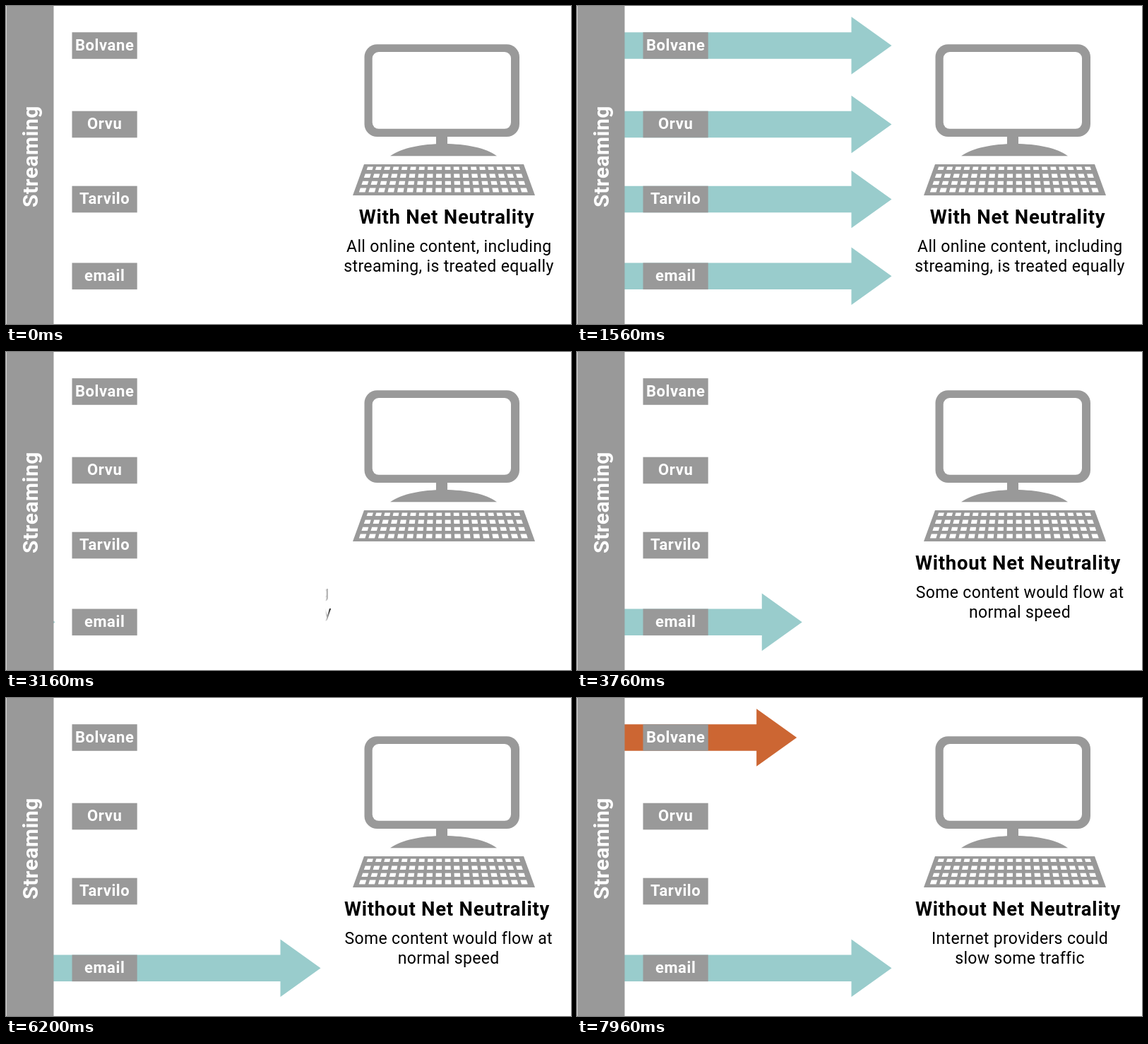
Animation of 800x450 px, one loop 8 s. Source, as an HTML page:

```html
<!DOCTYPE html>
<html lang="en">
<head>
<meta charset="utf-8">
<title>Net neutrality</title>
<style>
  html, body { margin: 0; width: 100%; height: 100%; overflow: hidden; background: #fff; }
  svg { display: block; width: 100%; height: 100%; }
  text { font-family: Roboto, sans-serif; text-anchor: middle; }
  .label { font-size: 22px; font-weight: 700; letter-spacing: .6px; fill: #fff; }
  .side { font-size: 30px; font-weight: 700; letter-spacing: .5px; fill: #fff; }
  .title { font-size: 27.5px; font-weight: 700; letter-spacing: .75px; }
  .sub { font-size: 23px; letter-spacing: .35px; }
</style>
</head>
<body>
<svg viewBox="0 0 800 450">
  <defs>
    <linearGradient id="fade" gradientUnits="userSpaceOnUse" x1="452" y1="0" x2="792" y2="0">
      <stop offset="0" stop-color="#000"/>
      <stop offset=".024" stop-color="#fff"/>
      <stop offset=".974" stop-color="#fff"/>
      <stop offset="1" stop-color="#000"/>
    </linearGradient>
    <mask id="window" maskUnits="userSpaceOnUse" x="452" y="270" width="340" height="130">
      <rect x="452" y="270" width="340" height="130" fill="url(#fade)"/>
    </mask>
  </defs>
  <rect width="800" height="450" fill="#fff"/>
  <g id="arrows"></g>
  <g id="labels"></g>
  <rect x=".6" width="66.9" height="450" fill="#999"/>
  <text class="side" transform="translate(45 213) rotate(-90)">Streaming</text>

  <g fill="#999">
    <rect x="507.5" y="54.2" width="219.5" height="130.8" rx="18"/>
    <rect x="518.7" y="65" width="196.3" height="108.8" rx="9" fill="#fff"/>
    <rect x="609" y="184" width="16" height="13"/>
    <path d="M544 212.3C560 201 588 195 620 195S680 201 695 212.3Z"/>
    <path d="M507 224H733L749 268H491Z"/>
    <path id="keys" fill="#fff"/>
  </g>

  <g mask="url(#window)">
    <text class="title" id="title1" x="624" y="308">With Net Neutrality</text>
    <text class="title" id="title2" x="624.5" y="308">Without Net Neutrality</text>
    <g class="sub" id="sub1">
      <text x="627.3" y="348">All online content, including</text>
      <text x="627" y="375.5">streaming, is treated equally</text>
    </g>
    <g class="sub" id="sub2">
      <text x="627" y="348">Some content would flow at</text>
      <text x="627" y="375.5">normal speed</text>
    </g>
    <g class="sub" id="sub3">
      <text x="627" y="348">Internet providers could</text>
      <text x="627" y="375.5">slow some traffic</text>
    </g>
  </g>
</svg>
<script>
const LOOP = 8000, STEP = 40, SLIDE = 370, SLIDE_MS = 440;
const TEAL = '#99cccc', ORANGE = '#cc6633';
const rows = [
  { name: 'Bolvane', y: 56, drop: 540 },
  { name: 'Orvu', y: 167.5, drop: 492 },
  { name: 'Tarvilo', y: 273.5, drop: 492 },
  { name: 'email', y: 382.3, drop: 492 }
];
const $ = id => document.getElementById(id);

function add(parent, tag, attrs, text) {
  const el = document.createElementNS('http://www.w3.org/2000/svg', tag);
  for (const k in attrs) el.setAttribute(k, attrs[k]);
  if (text) el.textContent = text;
  return parent.appendChild(el);
}

const progress = (t, start, ms) => Math.min(1, Math.max(0, (t - start) / ms));
const smooth = u => u * u * (3 - 2 * u);

// Cubic timing curve with control points (x1, 0) and (x2, 1)
function curve(u, x1, x2) {
  let lo = 0, hi = 1;
  for (let i = 0; i < 24; i++) {
    const s = (lo + hi) / 2, r = 1 - s;
    if (3 * s * r * r * x1 + 3 * s * s * r * x2 + s * s * s < u) lo = s; else hi = s;
  }
  return smooth(lo);
}

const fastTip = (t, start) => 66 + 379.5 * curve(progress(t, start, 1520), .33, .29);
const slowTip = t => 67 + 297 * smooth(progress(t, 6600, 1860));

const exitX = (t, start) => -SLIDE * progress(t, start, SLIDE_MS) ** 3;
const enterX = (t, start) => SLIDE * (1 - progress(t, start, SLIDE_MS)) ** 3;

function drawArrow(el, tip, y, color) {
  const visible = tip > 67.5 && y < 495;
  el.setAttribute('visibility', visible ? 'visible' : 'hidden');
  if (!visible) return;
  const back = tip - 57, left = Math.min(60, back);
  el.setAttribute('fill', color);
  el.setAttribute('d', `M${left} ${y - 18.8}H${back}V${y - 40.7}L${tip} ${y}L${back} ${y + 40.7}V${y + 18.8}H${left}Z`);
}

function keyPath() {
  const edge = (u, y) => {
    const k = 16 * (y - 224) / 44;
    return (507 - k + u * (226 + 2 * k)).toFixed(1);
  };
  let d = '';
  [[227.5, 232], [237.5, 243], [247.8, 253], [257.5, 263.5]].forEach(([top, bottom]) => {
    for (let i = 0; i < 18; i++) {
      const a = .028 + i * .0532, b = a + .034;
      d += `M${edge(a, top)} ${top}H${edge(b, top)}L${edge(b, bottom)} ${bottom}H${edge(a, bottom)}Z`;
    }
  });
  return d;
}

for (const row of rows) {
  row.arrow = add($('arrows'), 'path', {});
  add($('labels'), 'rect', { x: 93.5, y: row.y - 18.8, width: 92.2, height: 37.6, fill: '#999' });
  add($('labels'), 'text', { x: 139.7, y: row.y + 6.8, class: 'label' }, row.name);
}
$('keys').setAttribute('d', keyPath());

function shift(id, x) {
  $(id).setAttribute('transform', `translate(${x.toFixed(2)} 0)`);
}

function render(t) {
  const fall = smooth(progress(t, 2280, 460));
  rows.forEach((row, i) => {
    if (t < 3000) drawArrow(row.arrow, fastTip(t, 40), row.y + row.drop * fall, TEAL);
    else if (i === 3) drawArrow(row.arrow, fastTip(t, 3080), row.y, TEAL);
    else drawArrow(row.arrow, i === 0 ? slowTip(t) : 0, row.y, ORANGE);
  });
  const out = exitX(t, 2743), next = enterX(t, 3190);
  shift('title1', out);
  shift('sub1', out);
  shift('title2', next);
  shift('sub2', next + exitX(t, 6160));
  shift('sub3', enterX(t, 6587));
}

const begin = performance.now();
function tick() {
  const t = (performance.now() - begin) % LOOP;
  render(Math.floor(t / STEP) * STEP);
  requestAnimationFrame(tick);
}
tick();
</script>
</body>
</html>
```
